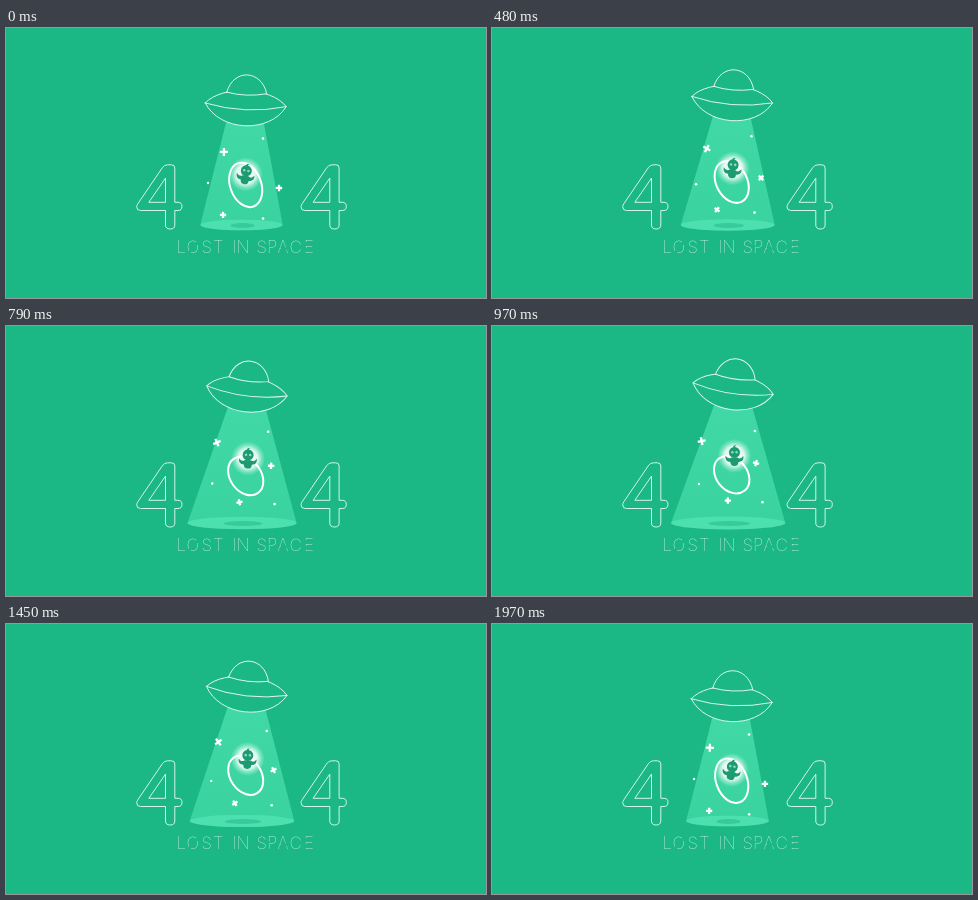
These frames come from a looping animation (480 px wide and 270 px high, 2000 ms). An HTML page:

```html
<!DOCTYPE html>
<html lang="en">
<head>
<meta charset="utf-8">
<title>404 – Lost in space</title>
<style>
  html, body { margin: 0; width: 100%; height: 100%; overflow: hidden; background: #1bb785; }
  svg { display: block; width: 100vw; height: 100vh; }
  .line { fill: none; stroke: #dcf8ec; stroke-width: .95; stroke-linejoin: round; stroke-linecap: round; }
  .caption { font: 100 17px Inter, Lato, sans-serif; fill: #e9faf3; }
</style>
</head>
<body>
<svg viewBox="0 0 480 270">
  <defs>
    <linearGradient id="light" x1="0" y1="0" x2="0" y2="1">
      <stop offset="0" stop-color="#5ff5c1" stop-opacity=".55"/>
      <stop offset="1" stop-color="#5ff5c1" stop-opacity=".45"/>
    </linearGradient>
    <radialGradient id="halo">
      <stop offset="0" stop-color="#fff" stop-opacity=".95"/>
      <stop offset=".55" stop-color="#fff" stop-opacity=".85"/>
      <stop offset=".8" stop-color="#fff" stop-opacity=".3"/>
      <stop offset="1" stop-color="#fff" stop-opacity="0"/>
    </radialGradient>
    <g id="four" class="line">
      <path d="M156.500 139.500Q158.200 136.800 161.500 136.800H165.500Q168.800 136.800 168.800 140V174.300H172Q176 174.300 176 178.400Q176 182.500 172 182.500H168.800V197Q168.800 201 164.200 201Q159.500 201 159.500 197V182.500H134.500Q130.700 182.500 130.700 178.800Q130.700 177.500 131.800 175.800Z"/>
      <path d="M159.500 150.500V174.300H143.200Z"/>
    </g>
  </defs>

  <rect width="480" height="270" fill="#1bb785"/>
  <use href="#four"/>
  <use href="#four" x="164.300"/>

  <text class="caption" y="225.200" x="170.500 180.500 195.500 207 218 226.500 230.500 243 250.500 261 271.500 283.500 298">LOST IN SPACE</text>
  <g id="cuts" fill="#1bb785"></g>

  <path id="beam" fill="url(#light)"/>
  <ellipse id="floor" cy="197" fill="#6ff7c8" fill-opacity=".36"/>
  <ellipse id="shadow" cy="197.500" ry="2.600" fill="#22b585" fill-opacity=".5"/>

  <ellipse id="ring" class="line" style="stroke:#fff;stroke-width:2"/>
  <g id="sparks"></g>

  <g id="visitor">
    <circle r="17" fill="url(#halo)"/>
    <g id="body" fill="#1c9a71">
      <path d="M-1 -8Q-2 -11 2 -10.500Q0 -10 1 -8Z"/>
      <circle cy="-3.500" r="5.500"/>
      <path d="M-3 1.500Q-6 4 -9 0Q-9.500 6 -4 6Q-4 10 0 10Q4 10 4 6Q9.500 6 9 0Q6 4 3 1.500Z"/>
      <g fill="#8fdcbd"><circle cx="-2.100" cy="-3.700" r="1.300"/><circle cx="2.100" cy="-3.700" r="1.300"/></g>
    </g>
  </g>

  <g id="ship" class="line" style="fill:#1bb785">
    <path d="M-40.500 0C-25 -19 25 -19 40.500 0C25 28 -25 28 -40.500 0Z"/>
    <path fill="none" d="M-40.500 0Q0 10 40.500 0"/>
    <path d="M-19.500 -11.800C-14 -36 14 -36 20.500 -12Q0 -7.500 -19.500 -11.800Z"/>
  </g>
</svg>
<script>
const LOOP = 2000;
const NS = "http://www.w3.org/2000/svg";
const el = id => document.getElementById(id);
const mix = (a, b, p) => a + (b - a) * p;

function set(node, attrs) {
  for (const name in attrs) node.setAttribute(name, attrs[name]);
  return node;
}
function add(parent, tag, attrs) {
  return parent.appendChild(set(document.createElementNS(NS, tag), attrs));
}

// Stencil gaps in the lettering: x, y, width, height
[[190, 213, 2, 4], [183, 221.5, 2, 4], [275, 219.5, 6, 2.2],
 [299, 214, 2, 4], [299, 219.8, 2, 4], [261.5, 217.5, 2.2, 2]]
  .forEach(([x, y, width, height]) => add(el("cuts"), "rect", { x, y, width, height }));

const crosses = [
  { from: [218, 124], to: [209.5, 115], arm: 4, turn: 80, delay: 60 },
  { from: [273, 160], to: [264, 137], arm: 3.2, turn: 105, delay: 20 },
  { from: [217, 187], to: [236, 174.5], arm: 3.1, turn: 90, delay: 30 }
];
const dots = [
  { from: [257, 110.5], to: [263, 105], r: 1.3 },
  { from: [202, 155], to: [207, 158], r: 1.2 },
  { from: [257, 190.5], to: [270.6, 176], r: 1.3 }
];
for (const c of crosses) {
  c.node = add(el("sparks"), "path", {
    d: `M${-c.arm} 0H${c.arm}M0 ${-c.arm}V${c.arm}`,
    stroke: "#fff", "stroke-width": 2.3
  });
}
for (const d of dots) d.node = add(el("sparks"), "circle", { r: d.r, fill: "#fff" });

// Smooth rise and fall, 0 to 1 to 0
const swing = (t, delay) => (1 - Math.cos(2 * Math.PI * (t - delay) / LOOP)) / 2;

function place({ node, from, to, turn = 0 }, p) {
  const x = mix(from[0], to[0], p), y = mix(from[1], to[1], p);
  set(node, { transform: `translate(${x} ${y}) rotate(${turn * p})` });
}

function draw(t) {
  const p = swing(t, 70);
  const shipY = mix(77, 62.3, p);
  set(el("ship"), { transform: `translate(${mix(239.7, 241.2, p)} ${shipY}) rotate(${mix(2.5, 8.3, p)})` });

  const rx = mix(41, 57.5, p), ry = mix(5.3, 6.5, p), cx = mix(235.5, 236.2, p);
  set(el("beam"), {
    d: `M${mix(221, 223, p)} ${shipY + 14}H${mix(257, 259, p)}L${cx + rx} 197A${rx} ${ry} 0 0 1 ${cx - rx} 197Z`
  });
  set(el("floor"), { cx, rx, ry });
  set(el("shadow"), { cx: cx + 1, rx: mix(12, 21, p) });

  set(el("ring"), {
    rx: 15.5, ry: mix(23, 20.5, p),
    transform: `translate(239.7 ${mix(157, 148.5, p)}) rotate(${mix(-20, -40, p)})`
  });
  set(el("visitor"), { transform: `translate(${mix(239.7, 242.5, p)} ${mix(146.5, 129.5, p)})` });
  set(el("body"), { transform: `rotate(${mix(10, 0, p)})` });

  for (const c of crosses) place(c, swing(t, c.delay));
  for (const d of dots) place(d, swing(t, 40));
}

const start = performance.now();
function tick() {
  draw((performance.now() - start) % LOOP);
  requestAnimationFrame(tick);
}
tick();
</script>
</body>
</html>
```
